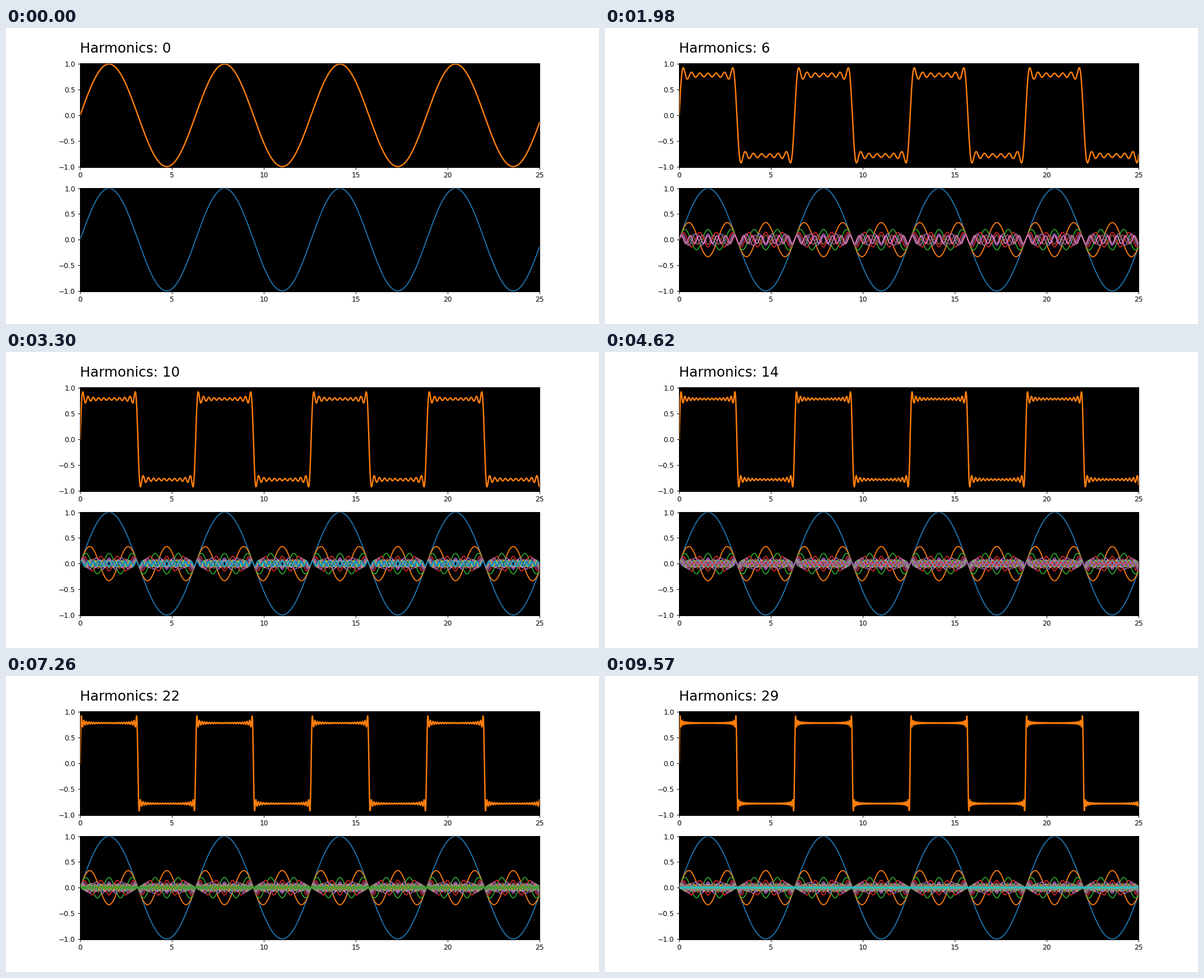
These frames come from a looping animation (1058x529 px, 9900 ms). A matplotlib script:

```python
import numpy as np
import matplotlib.pyplot as plt
from matplotlib.animation import FuncAnimation

WIDTH, HEIGHT = 1058, 529
FRAMES, INTERVAL = 30, 330
TITLE_BASELINE = 44  # pixels from the top edge

plt.rcParams["font.family"] = "DejaVu Sans"

x = np.linspace(0, 25, 2501)
odd = 2 * np.arange(FRAMES)[:, None] + 1
waves = np.sin(odd * x) / odd
sums = np.cumsum(waves, axis=0)

fig, (top, bottom) = plt.subplots(
    2, 1, figsize=(12, 6), dpi=WIDTH / 12, facecolor="white"
)
fig.subplots_adjust(
    left=0.125, right=0.9, bottom=0.11, top=0.88, hspace=0.2
)

for ax in (top, bottom):
    ax.set_facecolor("black")
    ax.set_xticks(range(0, 26, 5))
    ax.set_yticks(np.linspace(-1, 1, 5))
    ax.set_xlim(0, 25)
    ax.set_ylim(-1.01, 1.01)

title = fig.text(0.125, 1 - TITLE_BASELINE / HEIGHT, "", fontsize=20)
total, = top.plot(x, sums[0], color="C1", lw=2)
parts = [
    bottom.plot(x, wave, color=f"C{k % 10}", lw=1.5)[0]
    for k, wave in enumerate(waves)
]


def update(n):
    title.set_text(f"Harmonics: {n}")
    total.set_ydata(sums[n])
    for k, line in enumerate(parts):
        line.set_visible(k <= n)
    return [title, total, *parts]


anim = FuncAnimation(
    fig, update, frames=FRAMES, interval=INTERVAL, repeat=True, repeat_delay=0
)
plt.show()
```
